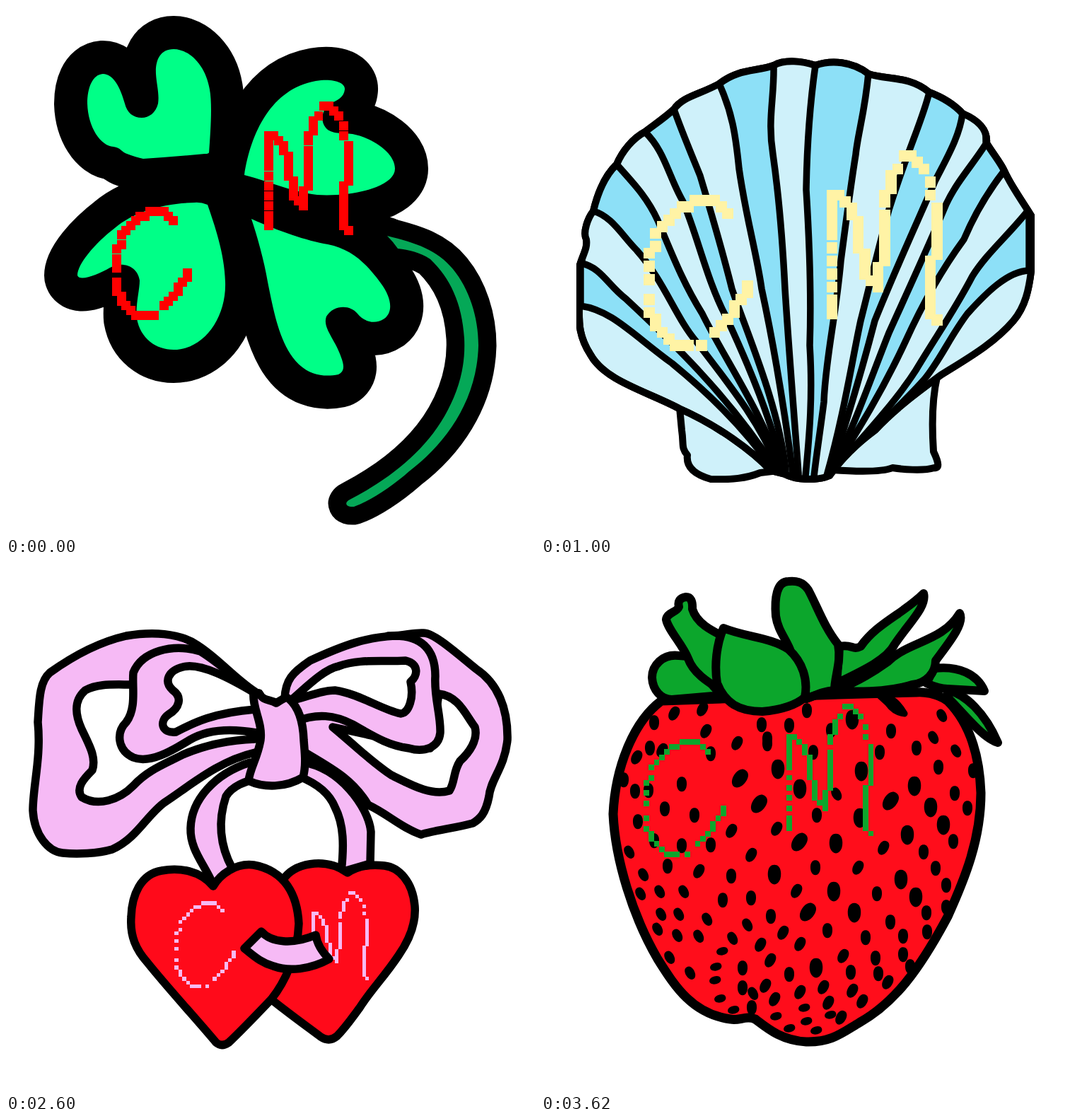
An HTML page that plays this animation: 748 by 748 pixels, repeating every 4.03 s.

```html
<!DOCTYPE html>
<html lang="en">
<head>
<meta charset="utf-8">
<title>C M charms</title>
<style>
  html, body { margin: 0; width: 100%; height: 100%; overflow: hidden; background: #fff; }
  svg { display: block; width: 100vw; height: 100vh; }
  .card { animation: show 4030ms step-end infinite; }
  .shell { animation-delay: -3030ms; }
  .bow { animation-delay: -2030ms; }
  /* one second of the loop; the strawberry lies underneath and fills the rest */
  @keyframes show {
    0% { visibility: visible; }
    24.8139%, 100% { visibility: hidden; }
  }
  .ink { stroke: #000; stroke-linejoin: round; stroke-linecap: round; }
  .letters { fill: none; stroke-linecap: square; shape-rendering: crispEdges; }
  .a { fill: #8de0f7; }
  .b { fill: #cff1fa; }
  .seeds polyline { fill: none; }
  .up { marker: url(#up); }
  .right { marker: url(#right); }
  .left { marker: url(#left); }
  .flat { marker: url(#flat); }
  .big { marker: url(#big); }
  .bigRight { marker: url(#bigRight); }
</style>
</head>
<body>
<svg viewBox="0 0 748 748">
<defs>
  <path id="C" d="M12 2h0M11 1h0M10 0h-3M6 1h-1M4 2h0M3 3h0M2 4h0M1 5h0M1 7h0M0 8h0M0 10h0M0 12h0M0 15h0M0 17h0M1 18v1M2 20h0M3 21h0M4 22h2M8 22h0M10 20h0M11 19h0M12 18h0M13 17v-1M14 15h0M15 14v-1"/>
  <path id="Mtop" d="M0 6v6M0 14h0M1 6h0M2 7h0M3 8v1M4 10v4M5 15v3M6 19h0M7 20v-3M8 16v-7M8 7v-1M9 5v-2M10 2h0M11 0h1M13 1h0M14 2h0M15 4h0M15 6h0M16 8v7M15 16v8M16 25h0"/>
  <g id="M">
    <use href="#Mtop"/>
    <path d="M0 16h0M0 18h0M0 20h0M0 22v2"/>
  </g>

  <g id="leaves">
    <path d="M287 208C289 180 292 140 288 118C282 82 258 61 237 61C217 61 211 78 212 96C213 112 217 124 215 138C212 151 202 158 192 158C180 158 171 151 168 138C162 116 152 96 137 96C122 97 115 116 115 138C116 172 134 198 152 199C162 200 164 207 171 209Q184 214 194 216Q240 213 281 209Q288 209 287 206Z"/>
    <path d="M337 239C346 180 375 117 438 106C462 102 480 108 479 118C478 129 468 134 460 137C446 146 444 162 452 172C460 182 476 179 490 181C520 187 550 208 550 230C550 256 490 270 440 267C400 262 370 247 337 239Z"/>
    <path d="M285 281Q275 277 266 278C220 279 180 292 155 313C125 336 101 365 101 381C104 390 130 380 147 370C165 360 186 368 189 388C189 402 183 422 185 442C190 470 212 486 237 486C280 486 312 440 310 390C309 350 295 310 285 281Z"/>
    <path d="M347 301C385 318 425 332 455 337C490 344 510 365 530 392C545 412 548 432 535 442C520 452 505 445 497 435C487 422 463 422 453 439C447 455 466 472 474 497C479 510 478 517 470 521C445 526 420 520 402 492C385 465 378 430 370 390C365 360 355 325 347 301Z"/>
  </g>
  <path id="stem" d="M539 325C580 335 610 345 632 372C655 400 668 440 668 480C666 560 620 620 570 658C545 680 515 700 492 708C480 709 478 702 486 698C540 670 590 632 620 580C640 545 650 510 648 470C645 420 628 385 600 358C585 348 570 345 554 343Q547 333 539 325Z"/>

  <path id="fan" d="M195 569C150 545 90 530 70 493C52 465 54 445 54 424L55 366C60 350 66 342 64 330C59 320 66 300 74 290C80 265 90 240 107 224C115 205 130 187 147 178C160 168 175 158 188 146C200 128 225 125 252 110C280 88 305 93 329 84C345 75 370 78 388 84C410 76 440 78 463 96C490 105 520 98 549 122C570 130 585 140 596 152C615 160 632 172 630 194C640 210 650 222 655 233C665 255 680 275 694 298L693 375C690 400 685 425 668 445C640 478 600 500 565 522C530 548 500 570 472 600C445 620 425 640 408 664C390 672 360 670 345 662L325 657C300 630 250 593 195 569Z"/>
  <clipPath id="inFan"><use href="#fan"/></clipPath>
  <clipPath id="crop"><path d="M50 73H698V674H50Z"/></clipPath>

  <path id="berry" d="M170 195C130 225 105 290 102 355C105 420 130 500 165 560C190 600 215 638 268 645C280 648 290 639 303 645C320 658 340 675 375 677C410 678 425 665 450 650C500 622 535 575 575 500C600 445 622 390 622 325C620 270 605 225 575 195C560 184 540 182 530 183L420 186Z"/>
  <clipPath id="inBerry"><use href="#berry"/></clipPath>
  <path id="seed" d="M0 -10C7 -10 7.500 0 5.500 5C3 11 -3 11 -5.500 5C-7.500 0 -7 -10 0 -10Z"/>
  <marker id="up" markerUnits="userSpaceOnUse" overflow="visible"><use href="#seed" transform="scale(1.08)"/></marker>
  <marker id="right" markerUnits="userSpaceOnUse" overflow="visible" orient="28"><use href="#seed" transform="scale(1.08)"/></marker>
  <marker id="left" markerUnits="userSpaceOnUse" overflow="visible" orient="-28"><use href="#seed"/></marker>
  <marker id="flat" markerUnits="userSpaceOnUse" overflow="visible" orient="75"><use href="#seed" transform="scale(.85)"/></marker>
  <marker id="big" markerUnits="userSpaceOnUse" overflow="visible"><use href="#seed" transform="scale(1.42)"/></marker>
  <marker id="bigRight" markerUnits="userSpaceOnUse" overflow="visible" orient="36"><use href="#seed" transform="scale(1.45)"/></marker>
</defs>

<g class="strawberry">
  <use href="#berry" fill="#ff0d1b"/>
  <g class="seeds" clip-path="url(#inBerry)">
    <polyline class="up" points="160 226 312 229 351 230 376 209 154 262 410 237 385 268 479 268 531 262 240 270 562 289 117 307 133 323 152 322 585 326 611 294 217 357 603 347 137 366 583 394 160 393 199 400 240 399 541 409 179 429 388 431 558 432 269 443 475 468 573 456 257 477 297 474 325 500 494 508 545 495 405 520 459 530 512 528 546 522 473 559 512 554 285 573 351 582 438 579 477 581 522 571 285 601 298 629 573 487 495 238 320 249 320 256 199 313 175 348 390 357"/>
    <polyline class="right" points="188 213 228 207 233 238 277 255 135 275 171 265 269 379 333 376 297 413 484 403 223 436 448 431 361 464 342 523 310 540 366 539 324 562 427 556 317 598 330 617 366 607 399 600 440 605 490 593 454 620 406 622 424 643"/>
    <polyline class="left" points="567 216 555 247 587 266 418 327 125 409 145 441 141 468 168 465 202 465 170 497 195 497 235 504 292 512 165 518 193 527 223 528 271 531 182 558 211 580 300 609"/>
    <polyline class="flat" points="256 549 247 571 246 590 253 616 272 632 332 641 372 629 409 639 351 658 375 648 389 661"/>
    <polyline class="big" points="440 222 335 292 453 295 366 320 528 316 551 346 451 361 518 385 417 397 569 371 330 441 414 465 509 448 530 473 443 495 389 573"/>
    <polyline class="bigRight" points="281 305 494 337 308 341 365 395 377 494"/>
  </g>
  <use href="#berry" class="ink" fill="none" stroke-width="13"/>
  <g class="ink" fill="#0ca62c" stroke-width="12">
    <path d="M575 180C600 185 628 212 646 254C625 248 600 215 575 190Z"/>
    <path d="M556 149C590 145 617 157 627 181L575 178C560 178 550 172 545 170Z"/>
    <path d="M422 118C440 114 440 124 452 118C475 85 512 72 541 43C546 62 520 85 500 115C490 135 460 150 418 170Z"/>
    <path d="M418 181C450 165 465 158 490 140C520 110 567 112 592 71C600 85 575 115 558 138C558 155 545 170 525 172C500 180 470 183 418 181Z"/>
    <path d="M195 131C172 128 157 145 157 162C158 180 170 193 185 193L255 187L240 170C225 160 215 150 208 132Z"/>
    <path d="M205 48Q192 50 195 62C192 70 178 70 177 80C180 95 200 115 208 135C215 155 235 168 255 180L260 105C240 95 220 85 214 65Q215 48 205 48Z"/>
    <path d="M350 26C333 26 330 50 332 75C335 95 345 105 352 122L375 192C390 186 400 181 415 180C415 160 425 140 420 115C400 90 390 60 378 38C370 26 360 25 350 26Z"/>
    <path d="M258 92C248 115 245 145 249 170C260 198 280 210 313 210C340 208 362 200 373 190C378 165 370 140 350 122C325 105 290 105 258 92Z"/>
    <path d="M375 192Q400 181 425 182" fill="none"/>
    <path d="M478 187Q500 188 514 213Q500 212 490 198Z" fill="#000" stroke-width="9"/>
  </g>
  <g class="letters" stroke="#0ca62c">
    <use href="#C" stroke-width="1.1" transform="translate(149 253)scale(7.25 7.22)"/>
    <use href="#M" stroke-width="1.1" transform="translate(351 203)scale(7.22 7.18)"/>
  </g>
</g>

<g class="card bow">
  <path fill="#fff" d="M0 0H748V748H0Z"/>
  <g class="ink" fill="#f6baf5" stroke-width="11.500">
    <path d="M345 282C295 298 262 335 261 375C260 405 280 425 293 455L320 432C300 395 301 360 311 330C320 315 340 308 352 306"/>
    <path d="M420 282C470 288 513 345 516 380L515 425L474 437C478 400 478 370 465 345C455 320 430 308 415 302"/>
    <path d="M352 182C320 160 300 135 272 117C245 98 205 97 170 103C130 112 90 135 62 155C47 168 47 195 45 225C50 275 38 315 38 350C40 385 60 408 80 410C100 412 130 411 150 405C185 390 200 355 225 338C260 315 300 280 352 268"/>
    <path fill="#fff" d="M180 172C150 172 130 170 112 180C95 195 98 215 107 235C118 258 128 275 122 293C110 305 98 318 107 331C130 345 160 335 180 315C200 293 225 284 250 271C285 256 320 250 352 249V243Z"/>
    <path d="M352 182C335 172 300 140 275 125C235 113 192 125 180 155C178 175 185 205 170 225C155 240 158 265 180 275C205 285 240 262 260 250C285 235 320 234 354 240"/>
    <path fill="#fff" d="M352 184C320 165 275 140 250 147C230 152 222 167 236 180C250 190 245 205 230 214C216 224 220 241 240 239C262 228 290 212 352 207Z"/>
    <path d="M540 103C560 104 575 98 590 99C605 98 640 130 665 150C695 170 710 205 709 250C705 290 685 306 683 330C678 355 670 362 660 368C635 375 605 378 587 384C560 375 540 355 512 342C490 305 460 290 418 265L418 215Z"/>
    <path fill="#fff" d="M612 185C640 188 650 215 663 232C668 250 655 268 642 280C632 295 635 310 627 322C600 330 570 312 545 300C515 280 490 255 462 232L600 262Z"/>
    <path d="M394 192C395 165 405 155 430 138C480 115 510 105 550 103C585 103 607 120 607 160C605 190 615 215 614 240C612 262 590 268 570 262C540 258 520 245 490 228C465 215 440 212 410 224"/>
    <path fill="#fff" d="M402 195C425 175 450 150 470 146C500 135 530 140 565 138C585 143 582 160 572 168C577 190 570 212 558 213C530 207 500 185 465 180C445 180 425 190 402 195Z"/>
    <path d="M350 183C348 205 363 225 360 250C356 275 345 290 343 308C365 318 395 318 420 303C425 285 422 265 421 250C420 225 415 205 400 192C395 188 388 195 382 198C372 192 364 196 358 184Z"/>
    <path fill="#ff0a1a" d="M483 438C450 415 405 425 392 448L375 617C400 637 425 655 445 670Q457 678 468 669C480 657 488 645 500 629C515 605 535 585 555 555C571 532 580 510 578 485C575 450 555 430 535 428C510 425 495 430 483 438Z"/>
    <path fill="#ff0a1a" d="M293 457C275 435 245 430 220 435C190 440 178 470 177 500C175 528 184 547 200 565C228 600 265 640 297 678Q305 685 315 678C335 659 355 638 375 617C395 592 412 555 414 510C412 470 395 435 350 427C325 424 303 440 293 457Z"/>
  </g>
  <g class="letters" stroke="#f6baf5">
    <use href="#C" stroke-width="1" transform="translate(241 481)scale(5.4 5.35)"/>
    <use href="#Mtop" stroke-width="1.05" transform="translate(434.5 466.5)scale(4.77 4.84)"/>
  </g>
  <path class="ink" fill="#f6baf5" stroke-width="11.500" d="M337 545L361 521C375 537 405 540 438 526C440 540 447 550 457 560C430 575 400 578 378 570C360 565 350 555 337 545Z"/>
</g>

<g class="card shell">
  <path fill="#fff" d="M0 0H748V748H0Z"/>
  <g class="ink" stroke-width="10" clip-path="url(#crop)">
    <path class="b" d="M196 568L199 600C202 620 198 625 207 635C205 650 215 662 240 669C270 670 290 668 310 660L335 657"/>
    <path class="b" d="M560 525C552 560 553 600 555 630Q567 655 556 653C540 658 510 655 497 653C480 660 440 658 412 656"/>
    <use href="#fan" class="b"/>
    <!-- each rib fills everything to its right -->
    <g clip-path="url(#inFan)" stroke-width="9.500">
      <path class="a" d="M56 424C100 430 130 465 185 505C240 550 290 600 328 655V800H760V0H56Z"/>
      <path class="b" d="M58 364C85 370 95 395 120 414C180 470 265 550 332 655V800H760V0H58Z"/>
      <path class="a" d="M74 290C100 297 115 325 135 345C175 390 190 440 220 475C270 540 310 590 336 655V800H760V0H74Z"/>
      <path class="b" d="M107 224C130 250 150 270 165 303C185 350 200 390 228 435C260 500 310 570 339 655V800H760V0H107Z"/>
      <path class="a" d="M147 178C175 205 180 240 200 275C220 320 235 390 262 440C290 500 325 580 342 655V800H760V0H147Z"/>
      <path class="b" d="M188 146C200 180 215 215 225 240C240 290 255 340 270 400C290 460 335 560 346 655V800H760V0H188Z"/>
      <path class="a" d="M252 110C270 150 275 180 280 230C290 300 305 350 312 400C325 460 340 540 356 660V800H760V0H252Z"/>
      <path class="b" d="M329 84C330 130 320 160 328 210C338 280 342 340 345 400C350 480 358 580 364 660V800H760V0H329Z"/>
      <path class="a" d="M388 84C380 140 376 200 375 260C380 340 382 420 380 480C385 560 378 620 374 665V800H760V0H388Z"/>
      <path class="b" d="M463 95C458 150 448 180 445 210C437 260 432 300 424 360C417 440 402 500 400 560C395 600 390 630 386 665V800H760V0H463Z"/>
      <path class="a" d="M549 122C540 160 518 205 492 288C480 330 466 390 452 445C440 500 428 580 404 664V800H760V0H549Z"/>
      <path class="b" d="M596 152C592 185 572 218 557 248C530 310 500 375 472 445C455 510 435 580 407 664V800H760V0H596Z"/>
      <path class="a" d="M629 195C610 225 588 248 573 280C550 335 520 400 492 462C465 530 445 590 410 660V800H760V0H629Z"/>
      <path class="b" d="M655 233C630 265 612 297 598 330C565 375 540 420 515 475C480 550 445 605 412 658V800H760V0H655Z"/>
      <path class="a" d="M688 290C660 325 630 350 610 382C585 430 560 465 530 515C500 562 450 615 414 656V800H760V0H688Z"/>
      <path class="b" d="M690 374C660 375 630 405 603 435C578 468 565 500 542 528C500 575 450 617 416 654V800H760V0H690Z"/>
    </g>
    <use href="#fan" fill="none"/>
  </g>
  <g class="letters" stroke="#fff3a5">
    <use href="#C" stroke-width="1.68" transform="translate(153 275)scale(9.27 9.32)"/>
    <use href="#M" stroke-width="1.68" transform="translate(411.5 212)scale(9.28)"/>
  </g>
</g>

<g class="card clover">
  <path fill="#fff" d="M0 0H748V748H0Z"/>
  <g class="ink" fill="none">
    <path d="M505 314L542 325" stroke-width="51"/>
    <use href="#stem" stroke-width="51"/>
    <use href="#leaves" stroke-width="94"/>
  </g>
  <use href="#stem" fill="#05a857"/>
  <use href="#leaves" fill="#00ff87"/>
  <g class="letters" stroke="#f00">
    <use href="#C" stroke-width="1.92" transform="translate(156.5 290.5)scale(6.67)"/>
    <use href="#M" stroke-width="1.84" transform="translate(371.5 141.5)scale(7.05)"/>
  </g>
</g>
</svg>
</body>
</html>
```
